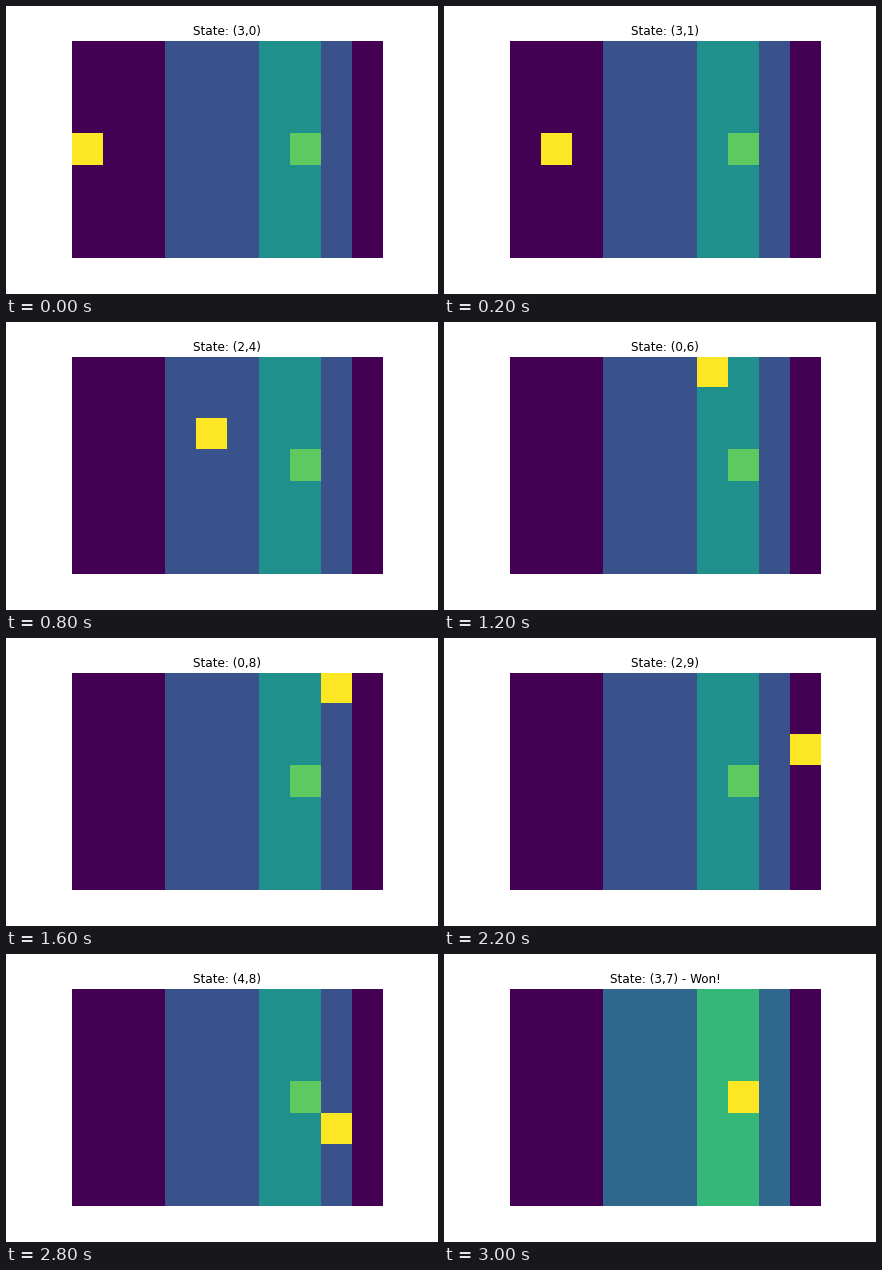
A matplotlib script that plays this animation: 432 by 288 pixels, repeating every 3200 ms.

```python
import numpy as np
import matplotlib.pyplot as plt
from matplotlib.animation import FuncAnimation

ROWS, COLS = 7, 10
WIND = np.array([0, 0, 0, 1, 1, 1, 2, 2, 1, 0])
START, GOAL = (3, 0), (3, 7)
MOVES = {"R": (0, 1), "D": (1, 0), "L": (0, -1)}
ACTIONS = "R" * 9 + "D" * 4 + "L" * 2


def step(state, action):
    """Move one cell; the wind of the current column pushes upwards."""
    (row, col), (dr, dc) = state, MOVES[action]
    return (min(max(row + dr - int(WIND[col]), 0), ROWS - 1),
            min(max(col + dc, 0), COLS - 1))


def walk():
    path = [START]
    for action in ACTIONS:
        path.append(step(path[-1], action))
    return path


def board(state):
    grid = np.tile(WIND, (ROWS, 1))
    grid[GOAL] = 3
    if state != GOAL:
        grid[state] = 4
    return grid


path = walk()
fig, ax = plt.subplots(figsize=(6, 4), dpi=72, facecolor="white")
fig.subplots_adjust(left=0.125, right=0.9, bottom=0.125, top=0.88)
ax.axis("off")
image = ax.imshow(board(START), cmap="viridis", interpolation="nearest")
title = ax.set_title("", fontsize=12, family="DejaVu Sans")


def update(i):
    state = path[i]
    grid = board(state)
    image.set_data(grid)
    # Colours rescale once the walker covers the goal
    image.set_clim(0, grid.max())
    won = " - Won!" if state == GOAL else ""
    title.set_text(f"State: ({state[0]},{state[1]}){won}")
    return image, title


anim = FuncAnimation(fig, update, frames=len(path), interval=200,
                     repeat=True, repeat_delay=0, blit=False)
plt.show()
```
